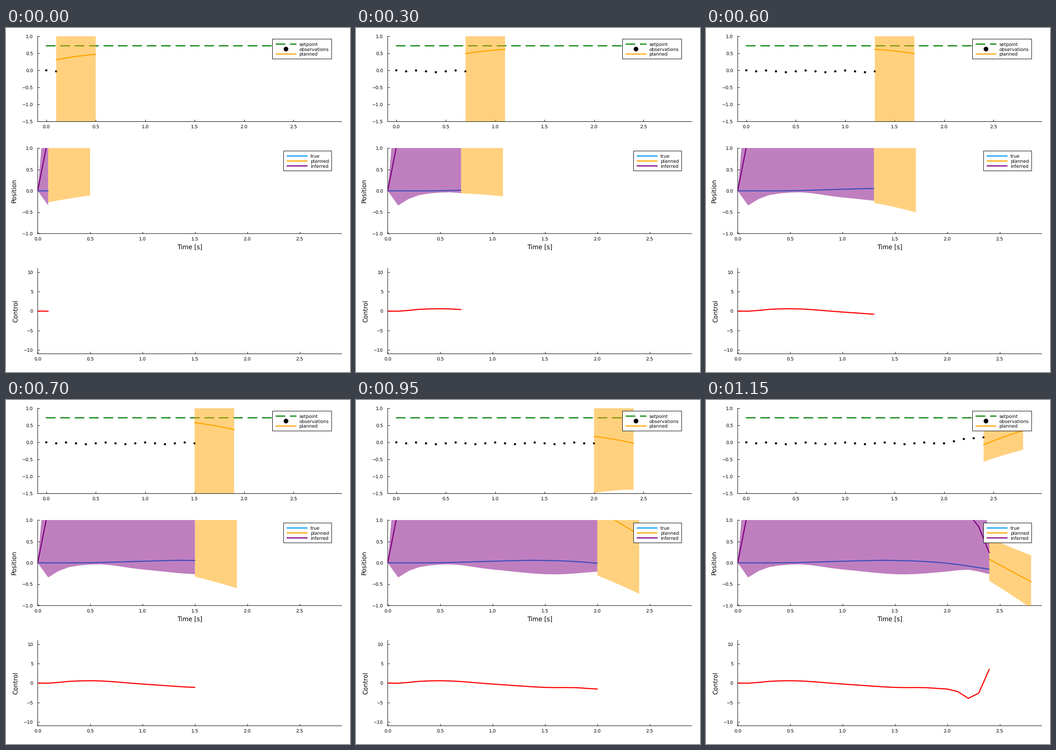
Recreate the animation shown at these times as a matplotlib script. Size 748 px wide and 748 px high, loop 1.2 s.

```python
import matplotlib.pyplot as plt
import numpy as np
from matplotlib.animation import FuncAnimation
from matplotlib.patches import Ellipse, Polygon, Rectangle

SIZE, DPI = 748, 100
PX = 72 / DPI  # points per pixel
FRAMES, INTERVAL = 24, 50
LEFT, WIDTH, HEIGHT = 68.9, 660.9, 185.8
TICK_FONT, GUIDE_FONT = 10 * PX, 13.5 * PX
BLUE = "#009afa"
SETPOINT = 0.717
LINE = {"lw": 2.41 * PX, "solid_capstyle": "round",
        "dash_capstyle": "round", "solid_joinstyle": "round"}
DASHED = {"dashes": (8, 5)}

plt.rcParams.update({"font.family": "DejaVu Sans", "path.snap": False,
                     "text.hinting": "none"})


def smooth(t, knots, values):
    """Cubic curve through a few key points."""
    t, knots, values = (np.asarray(a, float) for a in (t, knots, values))
    slopes = np.gradient(values, knots)
    i = np.clip(np.searchsorted(knots, t) - 1, 0, len(knots) - 2)
    h = knots[i + 1] - knots[i]
    s = (t - knots[i]) / h
    return ((1 + 2 * s) * (1 - s) ** 2 * values[i]
            + s * (1 - s) ** 2 * h * slopes[i]
            + s * s * (3 - 2 * s) * values[i + 1]
            + s * s * (s - 1) * h * slopes[i + 1])


# Signals over the whole run, sampled each 0.1 s
STEPS = FRAMES + 1
END = FRAMES / 10
TIME = np.arange(STEPS) / 10
RISE = np.clip((TIME - 1.9) / .5, 0, 1) ** 1.3
OBSERVED = -.03 - .025 * np.cos(5 * np.pi * TIME) + .2 * RISE
OBSERVED[0] = 0
TRUE = smooth(TIME, [0, .5, 1, 1.4, 2, 2.4],
              [0, .003, .037, .058, -.01, -.148])
CONTROL = smooth(TIME, [0, .1, .3, .5, 1, 1.5, 1.9, 2.1, 2.2, 2.3, 2.4],
                 [0, -.04, .44, .6, -.25, -1.12, -1.37, -2.2, -3.93, -2.6,
                  3.55])
INFERRED = np.interp(TIME, [0, .1, 1, 2.2, 2.3, 2.4],
                     [0, 1.24, 3, 1.16, .845, .24])
INFERRED_LOW = smooth(TIME, [0, .1, .2, .5, 1, 1.6, 2, 2.2, 2.4],
                      [0, -.342, -.19, -.04, -.155, -.27, -.204, -.161, -.263])

# Plans reach 0.4 s ahead; their two ends follow smooth curves
PART = np.linspace(0, 1, 5)
PLAN_KEYS = [.1, .3, .7, 1.1, 1.5, 2, 2.4]


def plan(t, starts, ends, bow):
    start, end = smooth(t, PLAN_KEYS, starts), smooth(t, PLAN_KEYS, ends)
    return start + (end - start) * PART + 4 * bow * PART * (1 - PART)


def top_plan_at(t):
    mean = plan(t, [.31, .33, .49, .6, .575, .175, -.07],
                [.47, .505, .612, .578, .372, -.025, .345], .015)
    left = END - t
    half = .5 * np.exp(3 * left + PART * (.12 - .8 * left))
    return mean, mean - half


def position_plan_at(t):
    start = np.interp(t, [0, 2, 2.3, END], [6, 1.25, .66, .085])
    mean = start - (.53 + .17 * (END - t)) * PART
    low = plan(t, [-.27, -.055, -.06, -.215, -.325, -.295, -.42],
               [-.11, 0, -.13, -.39, -.595, -.725, -1.065], .01)
    return mean, low


fig = plt.figure(figsize=(SIZE / DPI, SIZE / DPI), dpi=DPI, facecolor="white")


def panel(top, xlim, ylim, yticks):
    ax = fig.add_axes([LEFT / SIZE, 1 - (top + HEIGHT) / SIZE,
                       WIDTH / SIZE, HEIGHT / SIZE])
    ax.patch.set_visible(False)
    ax.set(xlim=xlim, ylim=ylim, xticks=np.arange(6) / 2, yticks=yticks)
    ax.set_axisbelow(True)
    ax.spines[["top", "right"]].set_visible(False)
    for side in ("left", "bottom"):
        ax.spines[side].set(linewidth=PX, zorder=.6)
    ax.tick_params(direction="in", length=4 * PX, width=PX,
                   labelsize=TICK_FONT)
    ax.tick_params(axis="x", pad=7 * PX)
    ax.tick_params(axis="y", pad=9.7 * PX)
    return ax


def line(ax, color, z):
    return ax.plot([], [], color=color, zorder=z, **LINE)[0]


def ribbon(ax, color, z):
    return ax.add_patch(Polygon(np.zeros((3, 2)), facecolor=color, alpha=.5,
                                lw=0, zorder=z))


def draw_band(curve, band, x, mean, low):
    """Mean line with a ribbon that is symmetric around it."""
    curve.set_data(x, mean)
    high = 2 * mean - low
    band.set_xy(np.column_stack([np.r_[x, x[::-1]], np.r_[low, high[::-1]]]))


top = panel(17.7, (-.087, 2.987), (-1.5, 1), np.arange(-3, 3) / 2)
pos = panel(261.2, (0, 2.9), (-1, 1), np.arange(-2, 3) / 2)
ctl = panel(522.6, (0, 2.9), (-11, 11), np.arange(-10, 11, 5))

top.plot([0, 2.9], [SETPOINT] * 2, color="green", zorder=1, **LINE, **DASHED)
dots = [top.add_patch(Ellipse(point, 4.8 * 3.074 / WIDTH, 4.8 * 2.5 / HEIGHT,
                              color="black", lw=0, zorder=2))
        for point in zip(TIME, OBSERVED)]
top_band, top_line = ribbon(top, "orange", 3), line(top, "orange", 4)

true_line = line(pos, BLUE, 1)
pos_band, pos_line = ribbon(pos, "orange", 2), line(pos, "orange", 3)
inf_band, inf_line = ribbon(pos, "purple", 4), line(pos, "purple", 5)

control_line = line(ctl, "red", 1)

# Labels and legends in pixel coordinates
over = fig.add_axes([0, 0, 1, 1], zorder=10)
over.set(xlim=(0, SIZE), ylim=(SIZE, 0))
over.axis("off")
for x, y, text, angle in ((21.7, 354, "Position", 90),
                          (25, 615.5, "Control", 90),
                          (400, 481, "Time [s]", 0)):
    over.text(x, y, text, fontsize=GUIDE_FONT, rotation=angle, ha="center",
              va="baseline", rotation_mode="anchor")


def legend(x, y, entries):
    over.add_patch(Rectangle((x, y), 708 - x, 43.2, facecolor="white",
                             edgecolor="black", lw=PX))
    for i, (name, color, kind) in enumerate(entries):
        row = y + 10.9 + 10.8 * i
        if kind == "dot":
            over.add_patch(Ellipse((x + 29.3, row), 10.2, 10.2, color=color,
                                   lw=0))
        else:
            style = DASHED if kind == "dash" else {}
            over.plot([x + 7.6, x + 51.2], [row] * 2, color=color, **LINE,
                      **style)
        over.text(x + 58, row + 3.6, name, fontsize=TICK_FONT, va="baseline")


legend(579.5, 24.1, [("setpoint", "green", "dash"),
                     ("observations", "black", "dot"),
                     ("planned", "orange", "line")])
legend(603.6, 267.4, [("true", BLUE, "line"), ("planned", "orange", "line"),
                      ("inferred", "purple", "line")])


def update(frame):
    n = frame + 2
    past, now = TIME[:n], TIME[n - 1]
    ahead = now + .4 * PART

    for i, dot in enumerate(dots):
        dot.set_visible(i < n)
    true_line.set_data(past, TRUE[:n])
    control_line.set_data(past, CONTROL[:n])
    draw_band(inf_line, inf_band, past, INFERRED[:n], INFERRED_LOW[:n])
    draw_band(top_line, top_band, ahead, *top_plan_at(now))
    draw_band(pos_line, pos_band, ahead, *position_plan_at(now))
    return dots


anim = FuncAnimation(fig, update, frames=FRAMES, interval=INTERVAL,
                     repeat=True, repeat_delay=0, blit=False)
plt.show()
```
